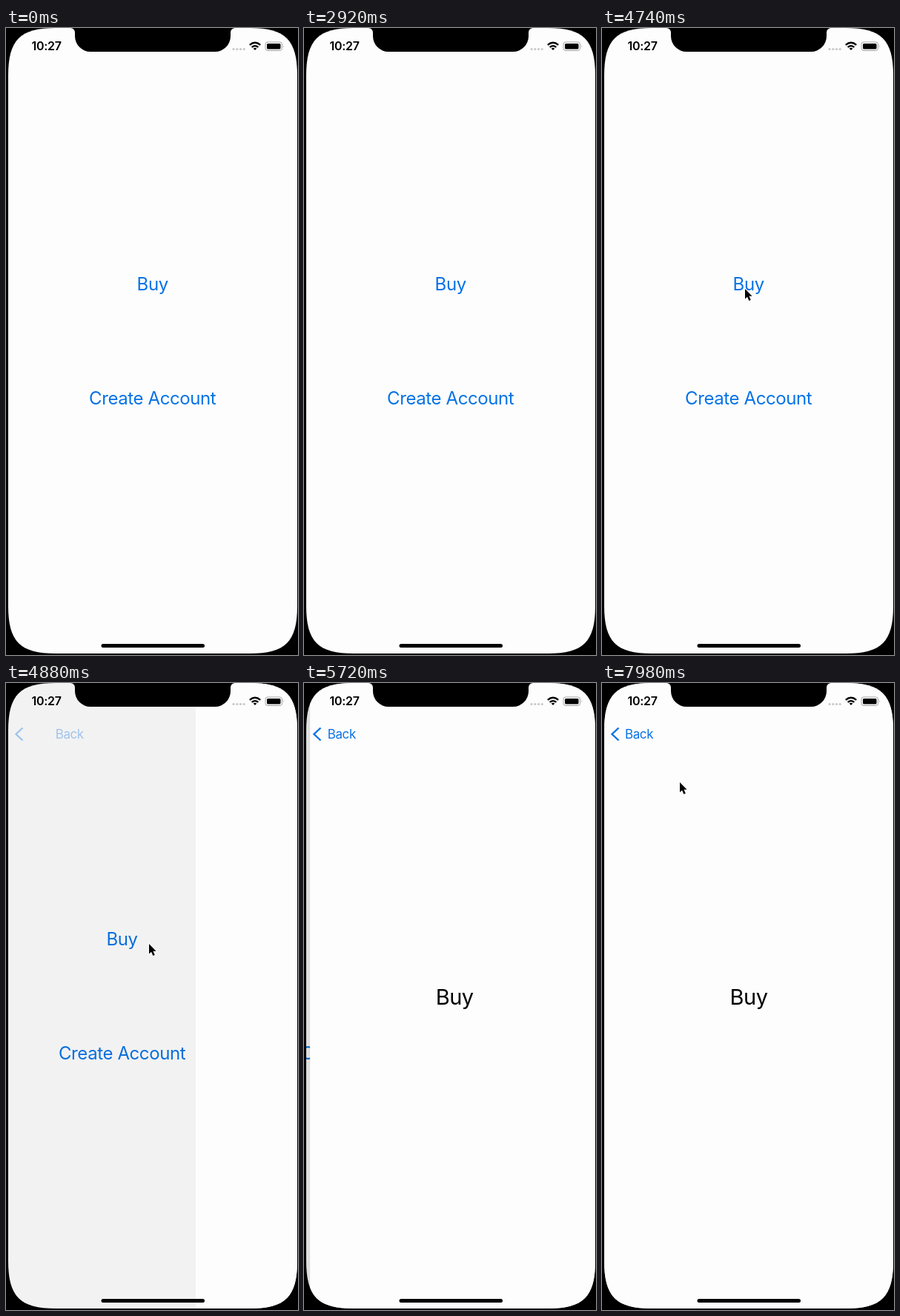
Recreate the animation shown at these times as an HTML page. Size 394 px wide and 846 px high, loop 8 s.

```html
<!DOCTYPE html>
<html lang="en">
<head>
<meta charset="utf-8">
<title>Push navigation</title>
<style>
  html, body { margin: 0; width: 100%; height: 100%; overflow: hidden; background: #000; }
  svg { display: block; width: 394px; height: 846px; font-family: Inter, "Liberation Sans", sans-serif; }
  .button { font-size: 24px; letter-spacing: -.4px; text-anchor: middle; }
  .title { font-size: 29px; letter-spacing: -.5px; text-anchor: middle; }
  .back { font-size: 17px; letter-spacing: -.4px; fill: #0a72e6; }
  .clock { font-size: 16px; font-weight: 600; letter-spacing: -.3px; }
</style>
</head>
<body>
<svg viewBox="0 0 394 846">
  <clipPath id="screen">
    <path d="M3 64C3 16 19 0 67 0H329C377 0 393 16 393 64V780C393 828 377 844 329 844H67C19 844 3 828 3 780Z"/>
  </clipPath>
  <g clip-path="url(#screen)">
    <rect id="homeFill" width="394" height="846"/>
    <g id="home">
      <text class="button" x="197.7" y="354">Buy</text>
      <text class="button" x="197.7" y="508">Create Account</text>
    </g>
    <g id="detail">
      <rect x="3" width="394" height="846" fill="#fdfdfd"/>
      <text class="title" x="198" y="434">Buy</text>
    </g>
    <g id="nav">
      <path d="M22.5 60.5L13.5 69L22.5 77.5" fill="none" stroke="#0a72e6" stroke-width="2.4"/>
      <text class="back" id="backLabel" y="75">Back</text>
    </g>

    <path d="M87 0A6 6 0 0 1 93 6V11A21 21 0 0 0 114 32H282A21 21 0 0 0 303 11V6A6 6 0 0 1 309 0Z"/>
    <text class="clock" x="34.5" y="30.3">10:27</text>
    <g fill="#c8c8c8">
      <circle cx="307" cy="28.5" r="1.6"/><circle cx="311.8" cy="28.5" r="1.6"/>
      <circle cx="316.5" cy="28.5" r="1.6"/><circle cx="321.2" cy="28.5" r="1.6"/>
    </g>
    <g fill="none" stroke="#000" stroke-width="2.2">
      <path d="M328.8 22.9Q336 16.6 343.2 22.9"/>
      <path d="M331.6 25.9Q336 22.2 340.4 25.9"/>
      <path d="M333.6 27.6Q336 25.8 338.4 27.6L336 30Z" fill="#000" stroke="none"/>
    </g>
    <rect x="350" y="19" width="22.5" height="11.5" rx="3" fill="none" stroke="#a3a3a3"/>
    <rect x="352" y="21" width="18.5" height="7.5" rx="1.5"/>
    <path d="M374 23Q375.6 24.7 374 26.5Z" fill="#a3a3a3"/>
    <rect x="128.5" y="831" width="139.5" height="5" rx="2.5"/>
    <path id="cursor" d="M0 0V13.5L3 10.8L5.4 16L7.8 15L5.5 9.8H9.6Z"
          stroke="#fff" stroke-width="1.6" paint-order="stroke"/>
  </g>
</svg>
<script>
const LOOP = 8000;
const PAGE_WIDTH = 390;
const PUSH_START = 102;   // in steps
const PUSH_RATE = 0.2165; // exponential settling per step

// Pointer moves: [first step, last step, from, to]
const MOVES = [
  [60, 80, [400, 620], [193, 352]],
  [111, 120, [193, 352], [-20, 300]],
  [138, 168, [-20, 190], [105, 134]],
];

const el = id => document.getElementById(id);
const shift = (id, x, y = 0) => el(id).setAttribute("transform", `translate(${x} ${y})`);

// Playback is uneven: each 140 ms holds three steps of 20, 100 and 20 ms.
function stepAt(ms) {
  const phase = ms % 140;
  return 3 * Math.floor(ms / 140) + (phase >= 20) + (phase >= 120);
}

function pointerAt(step) {
  const move = MOVES.filter(m => step >= m[0]).pop();
  if (!move) return [-50, -50];
  const [first, last, from, to] = move;
  const u = Math.min(1, (step - first) / (last - first));
  const eased = u * u * (3 - 2 * u);
  return from.map((v, i) => v + (to[i] - v) * eased);
}

function draw(ms) {
  const step = stepAt(ms);
  let rest = Math.exp(-PUSH_RATE * Math.max(0, step - PUSH_START));
  if (rest < 0.0013) rest = 0;
  const done = 1 - rest;
  const grey = 253 - 31 * done;

  shift("home", -0.3 * PAGE_WIDTH * done);
  shift("detail", PAGE_WIDTH * rest);
  el("homeFill").setAttribute("fill", `rgb(${grey}, ${grey}, ${grey})`);
  el("home").setAttribute("fill", `rgb(5, ${114 - 12 * done}, ${230 - 24 * done})`);

  el("nav").setAttribute("opacity", done);
  el("backLabel").setAttribute("x", 31 + 55 * rest);
  shift("cursor", ...pointerAt(step));
}

function tick() {
  draw(performance.now() % LOOP);
  requestAnimationFrame(tick);
}
tick();
</script>
</body>
</html>
```
